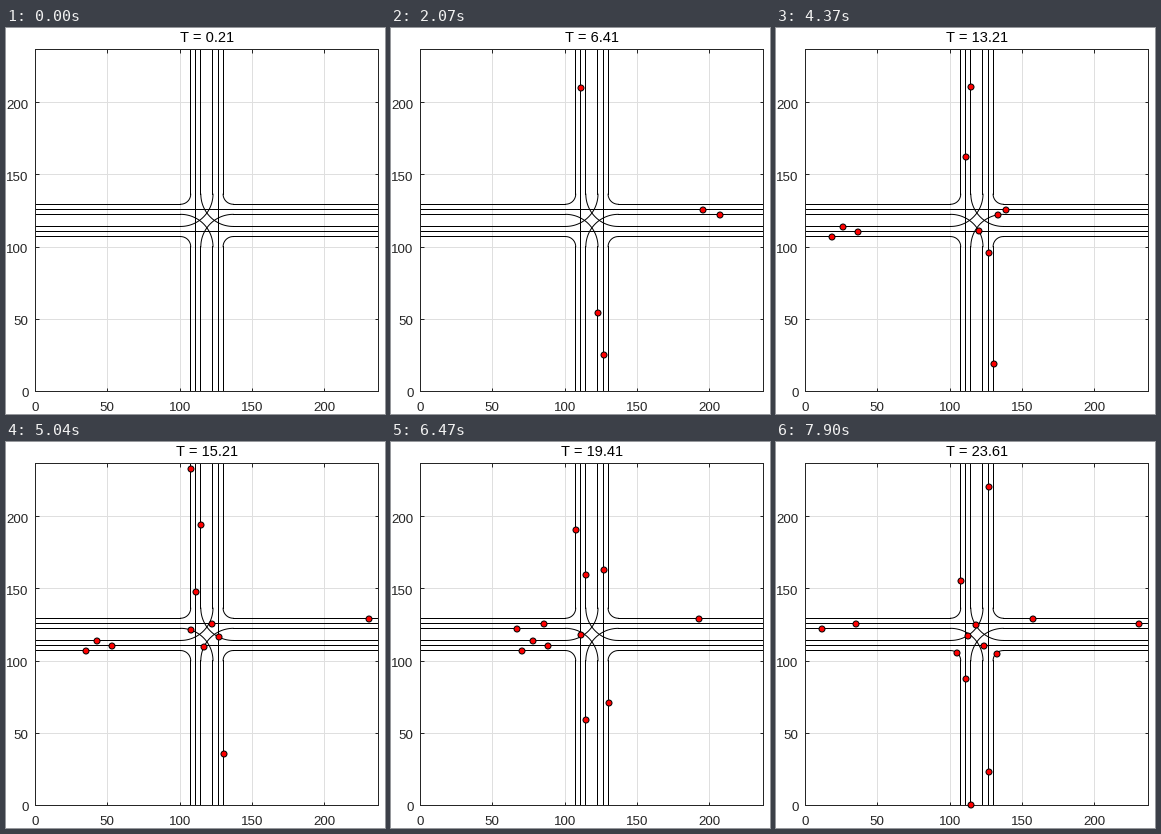
Animation, 379 px wide and 386 px high, one loop 8 s. Source, as a matplotlib script:

```python
import numpy as np
import matplotlib.pyplot as plt
from matplotlib.animation import FuncAnimation
from matplotlib.markers import MarkerStyle
from matplotlib.transforms import Affine2D

plt.rcParams["font.family"] = "Liberation Sans"

W, H, DPI = 379, 386, 100
PT = 72 / DPI                      # points per pixel
X0, X1, Y0, Y1 = 28.9, 371.9, 362.9, 20.9
SIZE, MID, BOX = 237, 118.5, 18.2  # road length, centre, junction half-width
ENTRY = MID - BOX
OFFSET = {"left": 4.2, "straight": 7.7, "right": 11.2}
TOP_SPEED, EXIT_ACC = 13.89, 1.0
LOOP, STEP_MS = 8000, 20
DOT = 6                            # dot diameter in pixels, without its edge
SOUTH, EAST, NORTH, WEST = range(4)

# start time, side, turn, entry speed, cruise speed, rate of change
CARS = [
    (0.79, SOUTH, "left", 12.9, 8.35, 1.3),
    (1.37, EAST, "straight", 8.34, 8.34, 1),
    (2.68, NORTH, "straight", 7.07, 7.07, 1),
    (3.61, EAST, "left", 10.83, 10.83, 1),
    (3.98, SOUTH, "straight", 10.43, 10.43, 1),
    (8.74, NORTH, "left", 4.0, 8.35, 0.8),
    (10.05, WEST, "straight", 13.4, 8.35, 1.3),
    (10.15, WEST, "left", 8.35, 8.35, 1),
    (10.88, SOUTH, "right", 8.35, 8.35, 1),
    (11.05, WEST, "right", 8.35, 8.35, 1),
    (14.59, EAST, "right", 11.75, 8.35, 1.3),
    (14.96, NORTH, "right", 13.14, 8.35, 1.3),
    (20.82, SOUTH, "straight", 8.35, 8.35, 1),
    (22.89, EAST, "straight", 9.1, 9.1, 1),
]

# moments (ms) at which the picture has advanced to the given step
STEP_TIMES = [0, 120, 870, 970, 1730, 1860, 2070, 2160, 2620, 2720, 3500,
              3600, 4370, 4590, 4730, 5460, 5580, 5680, 5800, 6360, 6470,
              6570, 7230, 7350, 7900, 8000]
STEPS = [0, 1, 8, 9, 16, 17, 19, 20, 24, 25, 32, 33, 40, 42, 43, 50, 51, 52,
         53, 58, 59, 60, 66, 67, 72, 73]


def turn_length(turn):
    if turn == "straight":
        return 2 * BOX
    sign = 1 if turn == "left" else -1
    return (BOX + sign * OFFSET[turn]) * np.pi / 2


def position(side, turn, s):
    """Point at distance s along a lane that enters from the given side."""
    off = OFFSET[turn]
    arc = turn_length(turn)
    if turn == "straight" or s <= ENTRY:
        x, y = off, s - MID
    else:
        sign = 1 if turn == "left" else -1
        r = BOX + sign * off
        a = min((s - ENTRY) / r, np.pi / 2)
        x = sign * (r * np.cos(a) - BOX - max(0, s - ENTRY - arc))
        y = r * np.sin(a) - BOX
    for _ in range(side):
        x, y = -y, x
    return MID + x, MID + y


def travel(t, v0, v1, acc):
    """Distance covered while the speed changes from v0 to v1 and then holds."""
    t1 = abs(v1 - v0) / acc
    if t < t1:
        return v0 * t + np.sign(v1 - v0) * acc * t * t / 2
    return (v0 + v1) / 2 * t1 + v1 * (t - t1)


def distance(t, turn, v0, v1, acc):
    exit_s = ENTRY + turn_length(turn)
    s = travel(t, v0, v1, acc)
    if s <= exit_s:
        return s
    return exit_s + travel((s - exit_s) / v1, v1, TOP_SPEED, EXIT_ACC)


def label(x, y, text, size, **kw):
    return fig.text(x / W, 1 - y / H, text, fontsize=size * PT,
                    va="baseline", **kw)


def lane_part(side, turn, a, b, n=2, **kw):
    pts = [position(side, turn, s) for s in np.linspace(a, b, n)]
    ax.plot(*zip(*pts), color="black", linewidth=PT, **kw)


fig = plt.figure(figsize=(W / DPI, H / DPI), dpi=DPI, facecolor="white")
ax = fig.add_axes([X0 / W, 1 - Y0 / H, (X1 - X0) / W, (Y0 - Y1) / H])
ax.set(xlim=(0, SIZE), ylim=(0, SIZE), autoscale_on=False)
ticks = range(0, SIZE, 50)
ax.set_xticks(ticks)
ax.set_yticks(ticks)
ax.set_axisbelow(True)
ax.grid(color="#dfdfdf", linewidth=PT)
ax.tick_params(direction="in", length=3.5 * PT, width=PT, color="#262626",
               top=True, right=True, labelbottom=False, labelleft=False)
for spine in ax.spines.values():
    spine.set(linewidth=PT, color="#262626")

for v in ticks:
    f = v / SIZE
    label(X0 + f * (X1 - X0), 383, str(v), 13.33, ha="center", color="#262626")
    label(22.5, Y0 - f * (Y0 - Y1) + 6.3, str(v), 13.33, ha="right",
          color="#262626")
title = label(201, 14, "", 14.67, ha="center", color="black")

# straight lines snap to pixel centres, so the curves move half a pixel too
half_pixel = ax.transData + Affine2D().translate(0.5, -0.5)
for side in range(4):
    for turn in OFFSET:
        end = ENTRY + turn_length(turn)
        if turn == "straight":
            lane_part(side, turn, 0, SIZE)
        else:
            lane_part(side, turn, 0, ENTRY)
            lane_part(side, turn, ENTRY, end, 40, transform=half_pixel)
            lane_part(side, turn, end, end + ENTRY)

shift = 0.5 / DOT
disc = MarkerStyle("o", transform=Affine2D().translate(shift, -shift))
dots, = ax.plot([], [], linestyle="none", marker=disc, markersize=DOT * PT,
                markerfacecolor="red", markeredgecolor="black",
                markeredgewidth=PT, clip_on=False, zorder=5)


def draw(k):
    ms = (k + 0.5) * STEP_MS
    step = int(np.interp(ms, STEP_TIMES, STEPS) + 1e-6)
    clock = 0.21 + 0.2 * int(1.63 * step + 0.4)
    pts = []
    for start, side, turn, v0, v1, acc in CARS:
        if clock < start:
            continue
        s = distance(clock - start, turn, v0, v1, acc)
        if s <= 2 * ENTRY + turn_length(turn):
            pts.append(position(side, turn, s))
    dots.set_data([p[0] for p in pts], [p[1] for p in pts])
    title.set_text(f"T = {clock:.2f}")
    return dots, title


anim = FuncAnimation(fig, draw, frames=LOOP // STEP_MS, interval=STEP_MS,
                     repeat=True, repeat_delay=0, blit=False)
plt.show()
```
